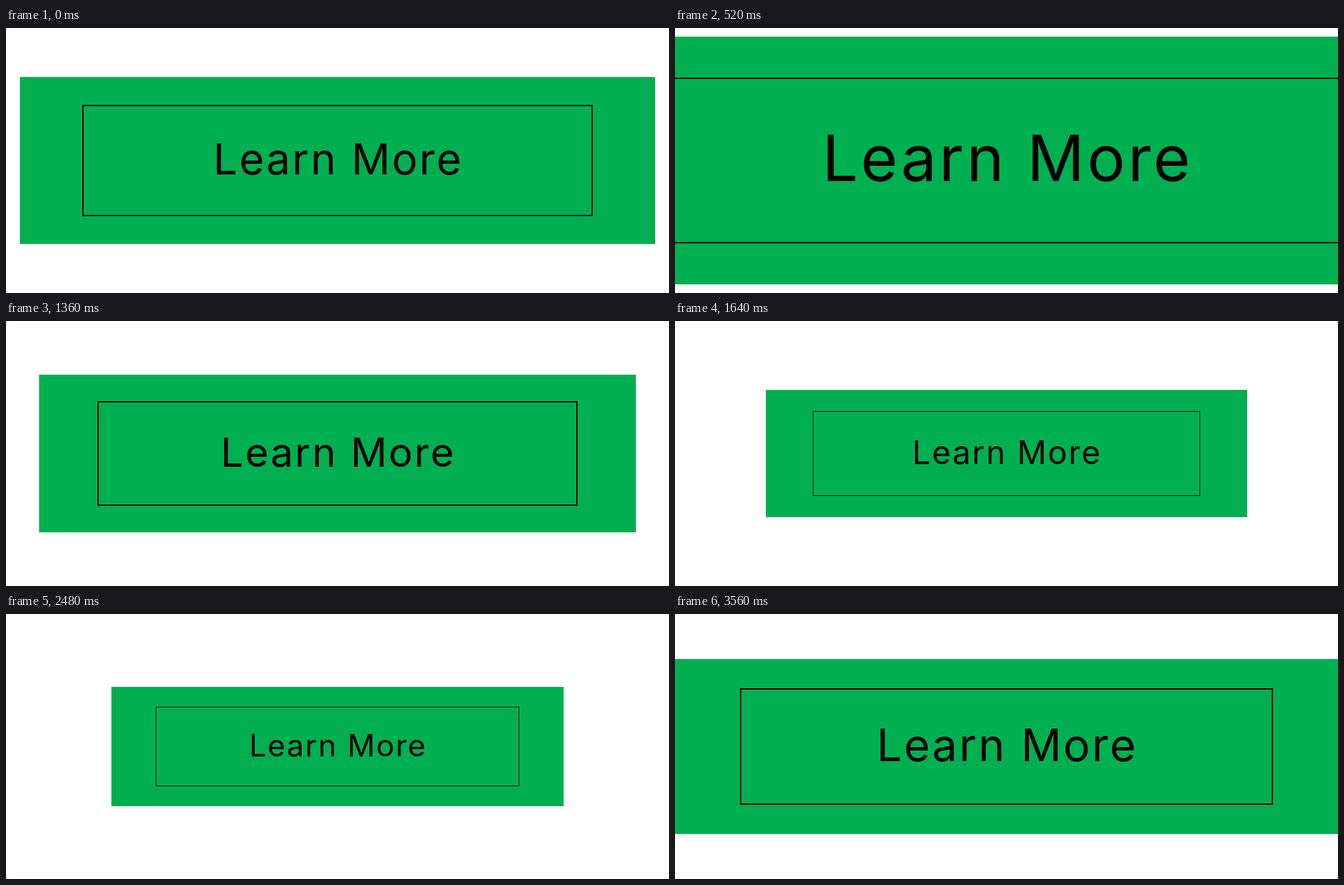
Animation, 1000 px wide and 400 px high, one loop 7.56 s. Source, as an HTML page with a canvas:

```html
<!DOCTYPE html>
<html lang="en">
<head>
<meta charset="utf-8">
<title>Learn More</title>
<style>
  html, body { margin: 0; width: 100%; height: 100%; overflow: hidden; background: #fff; }
  canvas { display: block; }
</style>
</head>
<body>
<canvas id="stage" width="1000" height="400"></canvas>
<script>
const ctx = document.getElementById('stage').getContext('2d');
const W = 1000, H = 400, CX = W / 2, CY = H / 2;
const LOOP = 7560, STEP = 40;
const GREEN = '#00b050';

// [time in ms, scale], linear in between
const KEYS = [[0, 0.958], [360, 1.52], [1960, 0.528], [3560, 1], [LOOP, 1]];

function scaleAt(t) {
  const i = KEYS.findIndex(k => k[0] > t);
  const [t0, s0] = KEYS[i - 1], [t1, s1] = KEYS[i];
  return s0 + (s1 - s0) * (t - t0) / (t1 - t0);
}

// Box around the centre, snapped to whole pixels
function box(halfW, halfH, color, inset = 0) {
  const x = Math.round(CX - halfW) + inset;
  const y = Math.round(CY - halfH) + inset;
  ctx.fillStyle = color;
  ctx.fillRect(x, y, W - 2 * x, H - 2 * y);
}

function label(text, s) {
  ctx.save();
  ctx.translate(CX, CY);
  ctx.scale(s, s);
  ctx.font = '67.5px Inter, Lato, sans-serif';
  ctx.letterSpacing = '2.7px';
  ctx.fillStyle = '#000';
  const m = ctx.measureText(text);
  const x = 1 - (m.actualBoundingBoxRight - m.actualBoundingBoxLeft) / 2;
  ctx.fillText(text, x, 21.7);
  ctx.restore();
}

function draw(t) {
  const s = scaleAt(t);
  const line = Math.max(1, Math.round(1.75 * s));

  ctx.fillStyle = '#fff';
  ctx.fillRect(0, 0, W, H);
  box(500 * s, 131.8 * s, GREEN);
  box(402 * s, 88 * s, '#000');
  box(402 * s, 88 * s, GREEN, line);
  label('Learn More', s);
}

const start = performance.now();

function tick() {
  const t = (performance.now() - start) % LOOP;
  draw(Math.floor(t / STEP) * STEP);
  requestAnimationFrame(tick);
}
tick();
</script>
</body>
</html>
```
